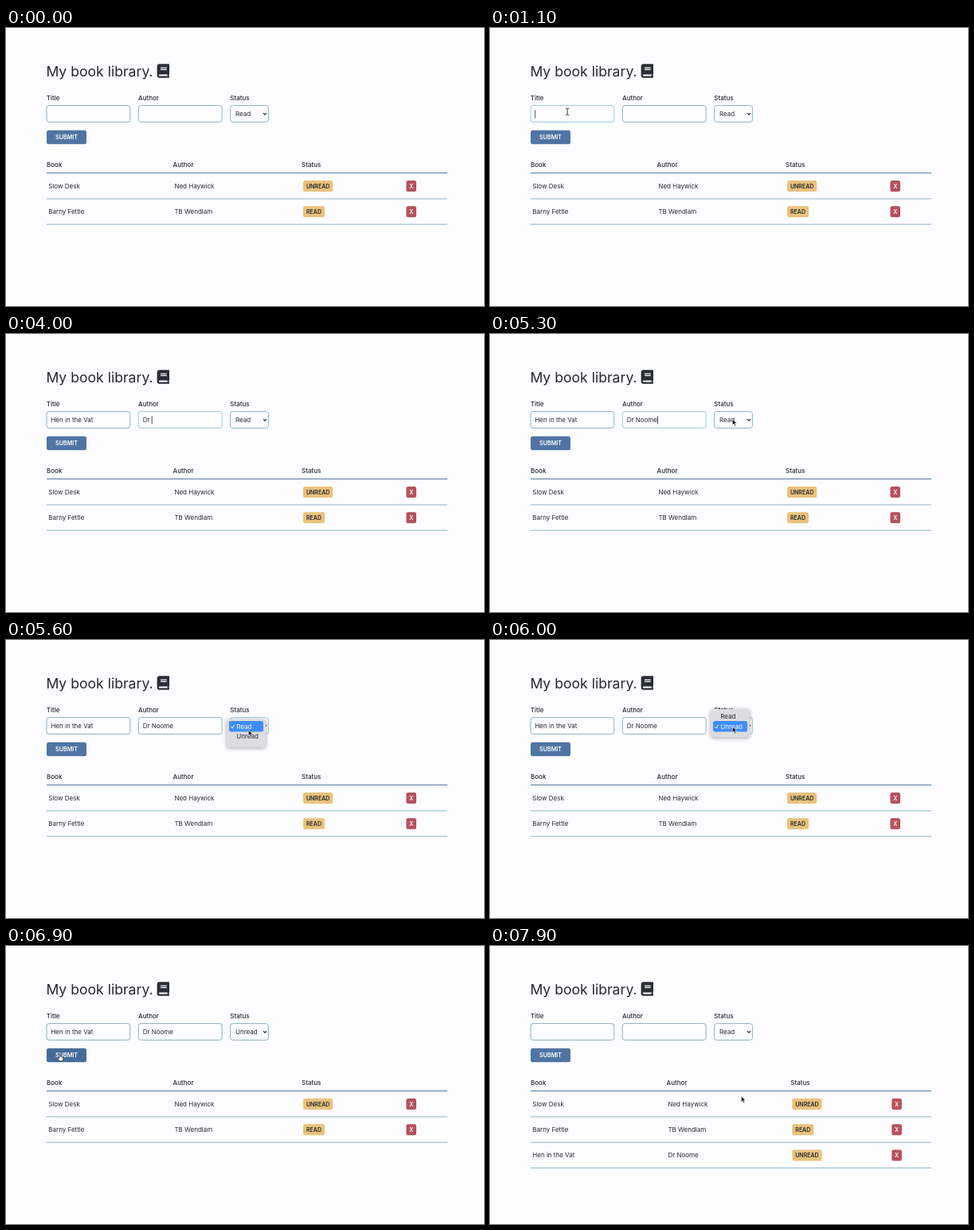
An HTML page for the animation above (8 s loop, 600 by 350 pixels).

```html
<!DOCTYPE html>
<html lang="en">
<head>
<meta charset="utf-8">
<title>My book library</title>
<style>
  html, body { margin: 0; width: 100%; height: 100%; overflow: hidden; background: #fdfcff; }
  svg { display: block; width: 600px; height: 350px; }
  text { font: 400 8px Inter, "Liberation Sans", sans-serif; fill: #25282e; white-space: pre; }
  .heading { font-size: 17.6px; }
  .label { font-weight: 500; }
  .tag { font-size: 7px; font-weight: 600; text-anchor: middle; }
  .light { fill: #fff; }
  .field { fill: #fefdff; stroke: #8eb0c2; }
  .field.focus { stroke: #9ac9e4; }
  .rule { stroke: #8db3c7; }
  .rule.strong { stroke: #4f7ba8; }
  .popup { filter: drop-shadow(0 1.5px 2.5px rgba(0, 0, 0, .35)); }
</style>
</head>
<body>
<svg id="stage" viewBox="0 0 600 350"></svg>
<script>
const LOOP = 8000;
const stage = document.getElementById('stage');

function add(parent, tag, attrs = {}, content = '') {
  const node = document.createElementNS('http://www.w3.org/2000/svg', tag);
  for (const key in attrs) node.setAttribute(key, attrs[key]);
  node.textContent = content;
  return parent.appendChild(node);
}
const group = (parent = stage) => add(parent, 'g');
const label = (parent, x, y, content, cls = '') =>
  add(parent, 'text', { x, y, class: cls }, content);
const box = (parent, x, y, width, height, rx, attrs) =>
  add(parent, 'rect', { x, y, width, height, rx, ...attrs });
const show = (node, visible) => node.setAttribute('display', visible ? 'inline' : 'none');
const move = (node, x, y) => node.setAttribute('transform', `translate(${x} ${y})`);
const range = (from, to) =>
  Array.from({ length: (to - from) / 100 + 1 }, (_, i) => from + i * 100);

// Header
label(stage, 50.4, 61, 'My book library.', 'heading');
add(stage, 'path', {
  transform: 'translate(189.6 45.2) scale(.0344)', fill: '#2b2e36', 'fill-rule': 'evenodd',
  d: 'M448 360V24Q448 0 424 0H96Q0 0 0 96V416Q0 512 96 512H424Q448 512 448 488V472' +
     'Q448 460 439 453Q433 416 439 379Q448 372 448 360Z' +
     'M128 128H352V160H128Z M128 192H352V224H128Z' +
     'M381 448H96Q64 448 64 416Q64 384 96 384H381Q378 416 381 448Z'
});

// Form
function makeField(x, width, name) {
  label(stage, x - .3, 90.6, name, 'label');
  const frame = box(stage, x, 97.6, width, 20.8, 3, { class: 'field' });
  const text = label(stage, x + 5.4, 111, '');
  return { frame, text, x };
}
const title = makeField(51, 104.8, 'Title');
const author = makeField(166.3, 104.8, 'Author');
const status = makeField(281.6, 47.8, 'Status');
status.text.setAttribute('x', 288);
add(stage, 'path', {
  d: 'M323 107.2l2 2l2-2', fill: 'none', stroke: '#222', 'stroke-width': 1.2
});
const caret = box(stage, 0, 103.2, .8, 10.2, 0, { fill: '#222' });

const button = box(stage, 51, 128.7, 50, 17.6, 2.5);
label(stage, 76, 140.3, 'SUBMIT', 'tag light').style.fontSize = '7.2px';

// Table
const line = (parent, y, cls) =>
  add(parent, 'path', { d: `M51 ${y}H554`, class: cls });
const table = group();
const columns = { author: group(table), status: group(table), remove: group(table) };
label(table, 51, 175, 'Book', 'label');
label(columns.author, 209.6, 175, 'Author', 'label');
label(columns.status, 371, 175, 'Status', 'label');
line(table, 182.5, 'rule strong');

function makeRow(index, book, writer, state) {
  const y = 199 + index * 32.2;
  const cells = [table, columns.author, columns.status, columns.remove].map(group);
  const width = state === 'READ' ? 27 : 37.2;
  label(cells[0], 53.3, y + 3, book);
  line(cells[0], y + 16, 'rule');
  label(cells[1], 211.4, y + 3, writer);
  box(cells[2], 373, y - 7, width, 14, 2.5, { fill: '#e9c27b' });
  label(cells[2], 373 + width / 2, y + 2.6, state, 'tag');
  box(cells[3], 502.4, y - 7, 12.6, 14, 2.5, { fill: '#b6515d' });
  label(cells[3], 508.7, y + 2.6, 'X', 'tag light');
  return cells;
}
const NEW_BOOK = 'Hen in the Vat', NEW_AUTHOR = 'Dr Noome';
makeRow(0, 'Slow Desk', 'Ned Haywick', 'UNREAD');
makeRow(1, 'Barny Fettle', 'TB Wendlam', 'READ');
const newRow = makeRow(2, NEW_BOOK, NEW_AUTHOR, 'UNREAD');

// Drop-down list; its checked item always lies over the select box
const popup = group();
box(popup, 277, 87, 49, 35.5, 4, { fill: '#dddce0', class: 'popup' });
const highlight = box(popup, 280, 102, 43, 13.4, 2.5, { fill: '#3f8dfb' });
const options = ['Read', 'Unread'].map((name, i) => label(popup, 289.3, 98.8 + i * 12.8, name));
const check = add(popup, 'path', { d: 'M282.6 109.2l1.5 1.9l2.6-4.4', fill: 'none' });

// Pointers, drawn from their hot spot
const pointers = { arrow: group(), beam: group(), hand: group() };
add(pointers.arrow, 'path', {
  d: 'M0 0V7.6L1.8 6L3.1 9L4.4 8.4L3.1 5.5H5.5Z',
  fill: '#111', stroke: '#fff', 'stroke-width': .6
});
add(pointers.beam, 'path', {
  d: 'M-2-4.3Q0-4.3 0-3Q0-4.3 2-4.3M0-3V3M-2 4.3Q0 4.3 0 3Q0 4.3 2 4.3',
  fill: 'none', stroke: '#222', 'stroke-width': .9
});
add(pointers.hand, 'path', {
  d: 'M-.8 .5Q0-.6 .7 .5V3Q1.5 2.4 2 3.2Q2.8 2.7 3.2 3.5Q4.2 3.2 4.2 4.2V6Q4 7 3.4 8.3H-.5' +
     'Q-1.5 6.6-2.8 5Q-2.6 3.8-.8 5Z',
  fill: '#fff', stroke: '#222', 'stroke-width': .7
});

// Time, x, y
const path = [
  [100, 406, 192], [300, 406, 192], [900, 92, 106], [1200, 99, 105], [1600, 99, 105],
  [2200, 88, 105.3], [4800, 88, 105.3], [5300, 304.3, 107], [5500, 304.3, 107],
  [5700, 304.3, 119], [5800, 304.3, 119], [6000, 304.3, 109], [6200, 304.3, 109],
  [6800, 67.5, 136.5], [7500, 67.5, 136.5], [7700, 98, 141], [7900, 315.3, 189]
];
function pointerAt(t) {
  const i = path.findIndex(point => point[0] > t);
  if (i === 0) return path[0].slice(1);
  if (i < 0) return path[path.length - 1].slice(1);
  const [t0, x0, y0] = path[i - 1], [t1, x1, y1] = path[i];
  const k = (t - t0) / (t1 - t0), ease = k * k * (3 - 2 * k);
  return [x0 + (x1 - x0) * ease, y0 + (y1 - y0) * ease];
}

const titleKeys = [1600, 1800, 1900, 2000, ...range(2500, 3200), 3400, 3500];
const authorKeys = [3800, 4000, 4000, ...range(4200, 4600)];
const typed = (text, keys, t) => text.slice(0, keys.filter(key => key <= t).length);
const within = (t, from, to) => t >= from && t < to;

function drawPopup(t) {
  const first = within(t, 5400, 5800), second = within(t, 6000, 6200);
  show(popup, first || second);
  const checked = first ? 0 : 1;
  const hovered = first && t < 5700 ? 0 : 1;
  move(popup, 0, first ? 12.8 : 0);
  move(highlight, 0, (hovered - 1) * 12.8);
  move(check, 0, (checked - 1) * 12.8);
  check.setAttribute('stroke', checked === hovered ? '#fff' : '#222');
  options.forEach((option, i) => option.setAttribute('class', i === hovered ? 'light' : ''));
}

function drawPointer(t) {
  const [x, y] = pointerAt(t);
  const visible = within(t, 100, 1600) || within(t, 2200, 2500) || t >= 4900;
  const inInput = y > 97 && y < 119 && (within(x, 51, 156) || within(x, 166, 271));
  const onButton = y > 128 && y < 146.5 && within(x, 51, 101);
  const kind = inInput ? 'beam' : onButton ? 'hand' : 'arrow';
  for (const name in pointers) {
    show(pointers[name], visible && name === kind);
    move(pointers[name], x, y);
  }
  button.setAttribute('fill', visible && onButton ? '#456c99' : '#5075a3');
}

function draw(time) {
  const t = Math.floor(time / 100) * 100;
  const submitted = t >= 7200;
  title.text.textContent = submitted ? '' : typed(NEW_BOOK, titleKeys, t);
  author.text.textContent = submitted ? '' : typed(NEW_AUTHOR, authorKeys, t);
  status.text.textContent = within(t, 5800, 7200) ? 'Unread' : 'Read';

  const focus = within(t, 900, 3600) ? title
    : within(t, 3600, 5400) ? author
    : within(t, 5400, 6900) ? status : null;
  for (const field of [title, author, status])
    field.frame.classList.toggle('focus', field === focus);

  const blinkOff = within(t, 1400, 1600) || within(t, 2200, 2500);
  const hasCaret = (focus === title || focus === author) && !blinkOff;
  show(caret, hasCaret);
  if (hasCaret) {
    const length = focus.text.textContent ? focus.text.getComputedTextLength() : 0;
    caret.setAttribute('x', focus.x + 5.4 + length);
  }

  newRow.forEach(cell => show(cell, submitted));
  move(columns.author, submitted ? 12 : 0, 0);
  move(columns.status, submitted ? 6.3 : 0, 0);
  move(columns.remove, submitted ? 1.9 : 0, 0);
  drawPopup(t);
  drawPointer(t);
}

const start = performance.now();
function tick(now) {
  draw(Math.max(0, now - start) % LOOP);
  requestAnimationFrame(tick);
}
draw(0);
requestAnimationFrame(tick);
</script>
</body>
</html>
```
